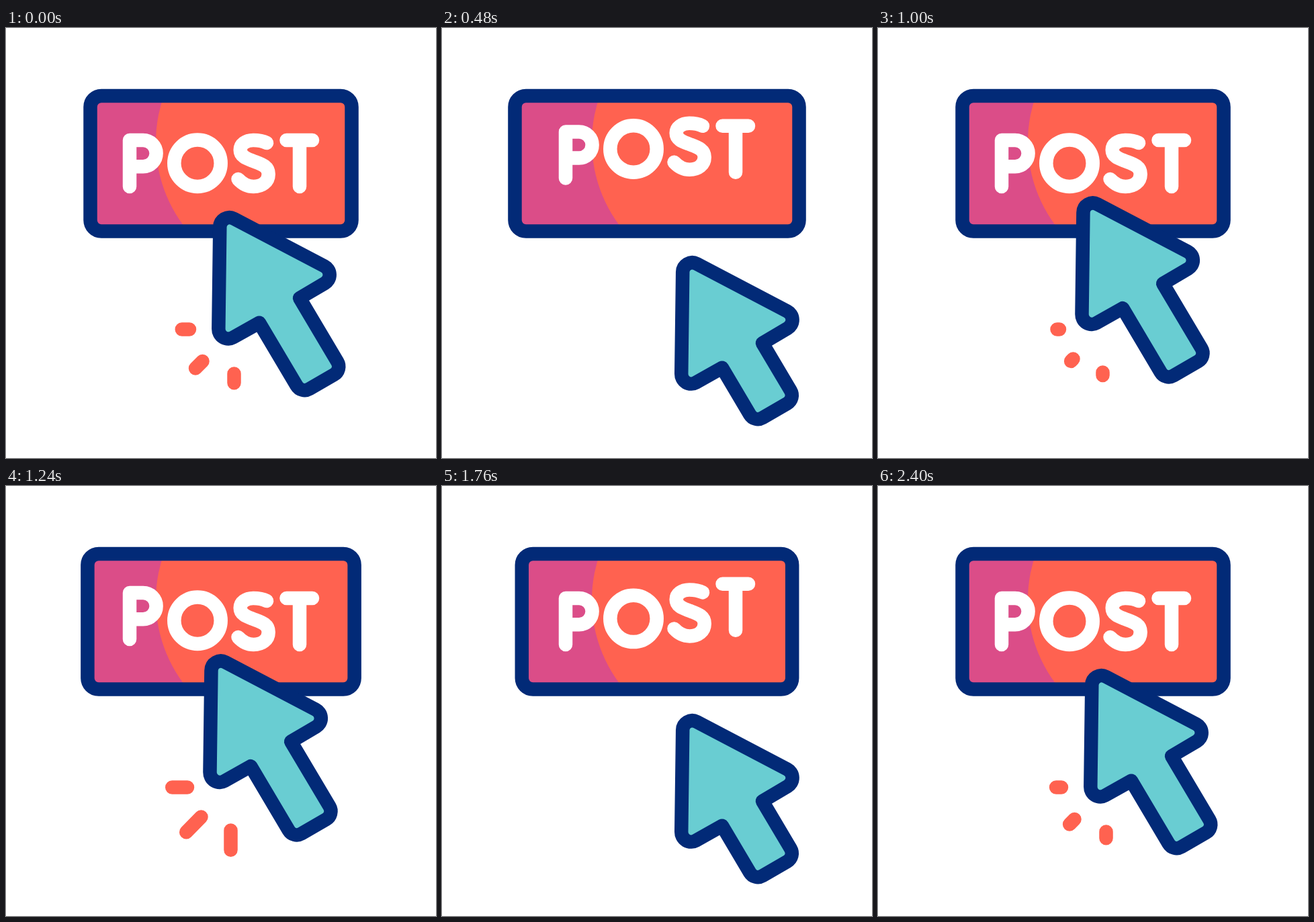
Animation of 640x640 px, one loop 2.44 s. Source, as an HTML page with a canvas:

```html
<!DOCTYPE html>
<html lang="en">
<head>
<meta charset="utf-8">
<title>Post button</title>
<style>
  html, body { margin: 0; width: 100%; height: 100%; overflow: hidden; background: #fff; }
  canvas { display: block; width: 640px; height: 640px; }
</style>
</head>
<body>
<canvas id="stage" width="640" height="640" role="img" aria-label="POST"></canvas>
<script>
const ctx = document.getElementById('stage').getContext('2d');
const LOOP = 2440, STEP = 40, CYCLE = 1120;
const NAVY = '#022a77', CORAL = '#ff6250', PINK = '#db4d88', TEAL = '#69cdd2';
const LINE = 20.5;

// Eased value through [time, value] keys.
function track(t, keys) {
  if (t <= keys[0][0]) return keys[0][1];
  for (let i = 1; i < keys.length; i++) {
    const [t0, a] = keys[i - 1], [t1, b] = keys[i];
    if (t < t1) {
      const x = (t - t0) / (t1 - t0);
      return a + (b - a) * x * x * (3 - 2 * x);
    }
  }
  return keys[keys.length - 1][1];
}

const ramp = (t, start, length) => track(t, [[start, 0], [start + length, 1]]);
const pulse = (t, start, half, size) =>
  track(t, [[start, 0], [start + half, size], [start + 2 * half, 0]]);
const swing = (t, far, near) =>
  track(t, [[0, 0], [560, far], [1120, near], [1680, far], [2240, 0]]);

const LETTERS = [
  'M184 236V167H204A19.6 19.6 0 0 1 204 206.2H184',
  'M319.7 201.3A34.7 34.7 0 1 1 250.3 201.3A34.7 34.7 0 1 1 319.7 201.3Z',
  'M388 171C381 167.5 375 167 368 167C357 167 348.7 173 348.7 181.5' +
  'C348.7 192 360 195 369 198.5C381 203 390.7 206 390.7 217.5' +
  'C390.7 229 381 236 368.5 236C358 236 351 231 345.5 225',
  'M417.5 167H456M437 167V236'
].map(d => new Path2D(d));

// Each spark runs from its first point to its second.
const SPARKS_A = [[273, 448.5, 250.5, 448.5], [292.5, 496, 271.5, 517], [339.5, 514.5, 339.5, 542]];
const SPARKS_B = [[270, 448.5, 245.5, 448.5], [290.5, 492.5, 266.5, 517], [334.5, 512.5, 334.5, 544]];

function drawButton(t) {
  const grow = pulse(t, 0, 400, 19);
  const box = new Path2D();
  box.roundRect(125.5 - grow, 100.9, 389 + 2 * grow, 201.6, 16.5);

  ctx.save();
  ctx.clip(box);
  ctx.fillStyle = PINK;
  ctx.fillRect(90, 90, 460, 230);
  ctx.fillStyle = CORAL;
  ctx.beginPath();
  ctx.arc(430, 170, 207, 0, 2 * Math.PI);
  ctx.fill();
  ctx.restore();

  ctx.strokeStyle = NAVY;
  ctx.stroke(box);

  ctx.strokeStyle = '#fff';
  LETTERS.forEach((letter, i) => {
    ctx.save();
    ctx.translate(0, -pulse(t, i * 80, 320, 25.2));
    ctx.stroke(letter);
    ctx.restore();
  });
}

function drawSparks(list, tail, head) {
  if (head <= 0 || tail >= 1) return;
  ctx.strokeStyle = CORAL;
  ctx.beginPath();
  for (const [x0, y0, x1, y1] of list) {
    ctx.moveTo(x0 + (x1 - x0) * tail, y0 + (y1 - y0) * tail);
    ctx.lineTo(x0 + (x1 - x0) * head, y0 + (y1 - y0) * head);
  }
  ctx.stroke();
}

function drawCursor(t) {
  const head = swing(t, 71, -34), tail = swing(t, 45.5, -28.5);
  const at = (x, y, d) => [x + d * 0.595, y + d];
  // Position and corner radius
  const corners = [
    [at(316, 473, head), 14.5],
    [at(318.6, 273, head), 14.2],
    [at(497, 366.6, head), 14.5],
    [at(437, 402, head), 0],
    [at(500.5, 508.8, tail), 14],
    [at(439.6, 544.2, tail), 14]
  ];
  ctx.beginPath();
  ctx.moveTo(...at(377, 438.7, head));
  corners.forEach(([p, r], i) => {
    const next = i + 1 < corners.length ? corners[i + 1][0] : at(377, 438.7, head);
    if (r) ctx.arcTo(...p, ...next, r);
    else ctx.lineTo(...p);
  });
  ctx.closePath();
  ctx.fillStyle = TEAL;
  ctx.strokeStyle = NAVY;
  ctx.fill();
  ctx.stroke();
}

function draw(t) {
  ctx.fillStyle = '#fff';
  ctx.fillRect(0, 0, 640, 640);
  ctx.lineWidth = LINE;
  ctx.lineCap = ctx.lineJoin = 'round';

  drawButton(t < 2 * CYCLE ? t % CYCLE : CYCLE);
  const a = (t + 200) % LOOP;
  drawSparks(SPARKS_A, ramp(a, 240, 400), ramp(a, 0, 400));
  drawSparks(SPARKS_B, ramp(t, 1240, 400), ramp(t, 905, 400));
  drawCursor(t);
}

const begin = performance.now();
function tick() {
  const t = (performance.now() - begin) % LOOP;
  draw(Math.floor(t / STEP) * STEP);
  requestAnimationFrame(tick);
}
tick();
</script>
</body>
</html>
```
